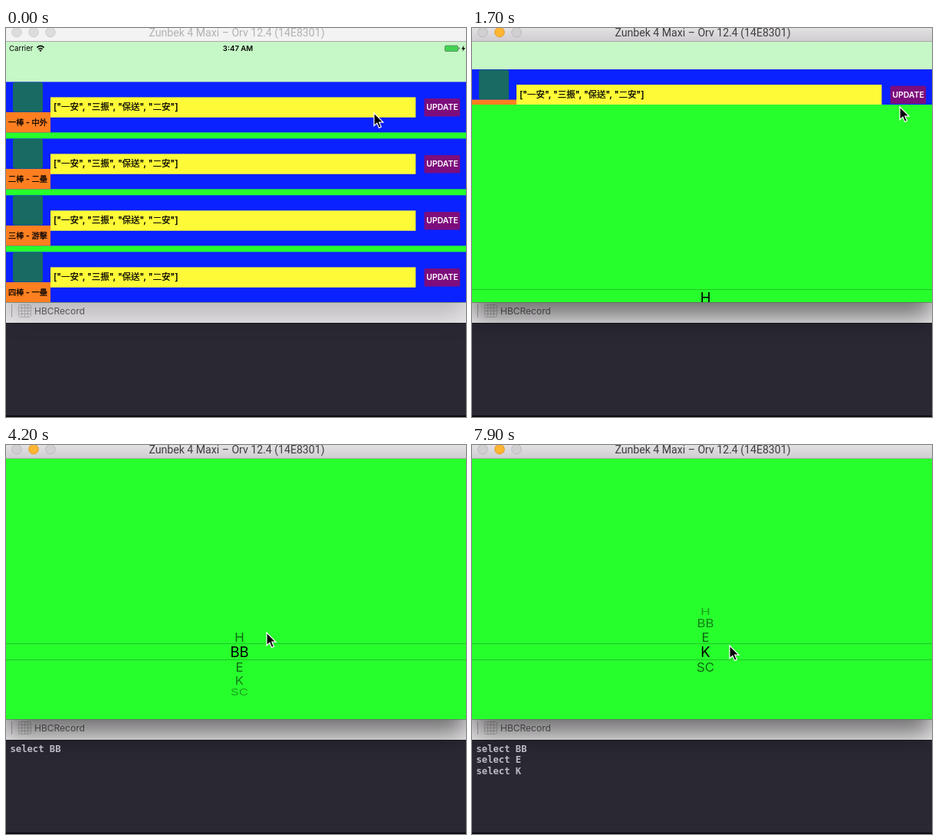
Write an HTML page that moves like this. It is 600 px wide and 508 px high and loops after 8 s.

```html
<!DOCTYPE html>
<html lang="zh-Hant">
<head>
<meta charset="utf-8">
<title>Batting record picker</title>
<style>
  html, body { margin: 0; width: 100%; height: 100%; overflow: hidden; background: #292833; }
  svg { display: block; width: 600px; height: 508px; }
  text { font-family: Inter, "Noto Sans CJK TC", "Noto Sans CJK JP", "Noto Sans CJK", sans-serif; white-space: pre; }
  .title { font: 14.1px Roboto, sans-serif; }
  .small { font-size: 9.6px; }
  .log { font: bold 12.2px "DejaVu Sans Mono", monospace; fill: #bdbbc4; }
  .order { font-size: 10.2px; font-weight: 500; stroke: #000; stroke-width: .25px; }
  .record { font-size: 11.5px; font-weight: 500; stroke: #000; stroke-width: .25px; }
  .button { font-size: 10.5px; font-weight: 600; fill: #fff; }
  .mid { text-anchor: middle; }
</style>
</head>
<body>
<svg viewBox="0 0 600 508" xmlns="http://www.w3.org/2000/svg">
  <defs>
    <linearGradient id="bar" x2="0" y2="1">
      <stop stop-color="#e4e1e4"/><stop offset="1" stop-color="#d0cdd0"/>
    </linearGradient>
    <filter id="blur" x="-20%" y="-30%" width="140%" height="160%"><feGaussianBlur stdDeviation="16"/></filter>
    <clipPath id="below"><rect y="358" width="600" height="150"/></clipPath>
    <clipPath id="screen"><rect y="18" width="600" height="340"/></clipPath>
    <clipPath id="lensClip"><rect y="260" width="600" height="20.5"/></clipPath>
    <clipPath id="dimClip"><path d="M0 190H600V259.5H0ZM0 281H600V358H0Z"/></clipPath>
  </defs>

  <rect width="600" height="508" fill="#292833"/>
  <rect y="506" width="600" height="2" fill="#0d0b12"/>

  <g clip-path="url(#below)">
    <rect y="358" width="600" height="27" fill="#eae8ea"/>
    <path d="M7.5 361V378" stroke="#a9a7a9"/>
    <g fill="none" stroke="#bfbdbf">
      <rect x="16.5" y="361.5" width="16" height="16" rx="2"/>
      <path d="M20.5 361V378M24.5 361V378M28.5 361V378M16 365.5H33M16 369.5H33M16 373.5H33"/>
      <circle cx="24.5" cy="369.5" r="4.5"/>
    </g>
    <text x="37" y="373.6" font-size="12" fill="#656365">HBCRecord</text>
    <path d="M0 385.5H600" stroke="#1b1a22"/>
    <rect id="shadow" y="100" width="599" height="277" filter="url(#blur)"/>
  </g>
  <g id="logs"></g>

  <g clip-path="url(#screen)">
    <rect y="18" width="600" height="340" fill="#27ff2d"/>
    <g id="list">
      <rect y="18" width="600" height="53" fill="#c6f7c7"/>
      <g id="rows"></g>
    </g>
    <g id="status">
      <text class="small" x="4" y="30.3">Carrier</text>
      <g fill="none" stroke="#000" stroke-width="1.5">
        <path d="M40.4 25.6Q45 21.2 49.6 25.6M42.2 27.8Q45 25.2 47.8 27.8"/>
      </g>
      <path d="M45 31L43.3 29.2Q45 27.8 46.7 29.2Z"/>
      <text class="small mid" x="302.5" y="30.3" font-weight="600">3:47 AM</text>
      <rect x="572.5" y="23" width="17" height="7.5" rx="1.5" fill="#42d354" stroke="#58805c" stroke-width=".8"/>
      <path d="M591 25.3V28.3" stroke="#58805c" stroke-width="1.2"/>
      <path d="M597.5 22.5L594 27.4H596.4L595.4 31L599 26H596.7Z"/>
    </g>
    <g id="modal">
      <rect y="18" width="600" height="342" fill="#27ff2d"/>
      <g id="dim" clip-path="url(#dimClip)"></g>
      <g id="lens" clip-path="url(#lensClip)"></g>
      <path d="M0 259.5H600M0 280.5H600" stroke="#1fc526"/>
    </g>
  </g>
  <path d="M0 358.5H600" stroke="#4d6b50" stroke-opacity=".6"/>

  <rect id="titleBar" width="600" height="17"/>
  <path d="M0 17.5H600" stroke="#aaa7aa"/>
  <g id="dots" stroke-width="1"></g>
  <text id="title" class="title mid" x="301" y="11">Zunbek 4 Maxi – Orv 12.4 (14E8301)</text>

  <g id="pointer">
    <g id="ring" fill="none">
      <circle r="23.3" stroke="#fff" stroke-opacity=".75" stroke-width="3.6"/>
      <circle r="23.3" stroke="#000" stroke-width="1.8"/>
    </g>
    <path d="M0 -1V15.6L3.9 12.2L6.6 18.4L9.4 17.2L6.8 11.2H12Z" stroke="#fff" stroke-width="1.2"/>
  </g>
</svg>

<script>
const LOOP = 8000, STEP = 100;
const $ = id => document.getElementById(id);

function add(parent, tag, attrs, text = "") {
  const el = document.createElementNS("http://www.w3.org/2000/svg", tag);
  for (const name in attrs) el.setAttribute(name, attrs[name]);
  el.textContent = text;
  return parent.appendChild(el);
}

// Eased value through [time, value] keys, held at both ends.
function track(keys, t) {
  if (t <= keys[0][0]) return keys[0][1];
  for (let i = 1; i < keys.length; i++) {
    const [t0, a] = keys[i - 1], [t1, b] = keys[i];
    if (t < t1) {
      const s = (t - t0) / (t1 - t0);
      return a + (b - a) * s * s * (3 - 2 * s);
    }
  }
  return keys[keys.length - 1][1];
}

["一棒 - 中外", "二棒 - 二壘", "三棒 - 游擊", "四棒 - 一壘"].forEach((label, i) => {
  const row = add($("rows"), "g", { transform: `translate(0 ${70.4 + 74 * i})` });
  const box = (x, y, width, height, fill, rx = 0) => add(row, "rect", { x, y, width, height, fill, rx });
  box(0, 0, 600, 66, "#0a22ff");
  box(9, 0.4, 39, 39, "#176b62", 3);
  box(0, 39.6, 58, 26.4, "#ff7f20");
  box(58, 20, 476.4, 26.4, "#fffa37");
  box(545.6, 21.6, 46.6, 23.4, "#7d0d7d", 2);
  add(row, "text", { x: 3, y: 56.8, class: "order" }, label);
  add(row, "text", { x: 62, y: 37, class: "record" }, '["一安", "三振", "保送", "二安"]');
  add(row, "text", { x: 569, y: 37, class: "button mid" }, "UPDATE");
});

const dots = [14, 36, 58].map(cx => add($("dots"), "circle", { cx, cy: 5.5, r: 6.3 }));

const logs = [["select BB", 4100], ["select E", 6000], ["select K", 7800]].map(([text, at], i) => ({
  at, el: add($("logs"), "text", { x: 5.5, y: 401 + 14.3 * i, class: "log" }, text)
}));

const options = ["H", "BB", "E", "K", "SC"].map(name => ({
  dim: add($("dim"), "text", { class: "mid", dy: ".364em", "font-size": 16.8 }, name),
  lens: add($("lens"), "text", { class: "mid", dy: ".364em", "font-size": 18.5 }, name)
}));

const pointerX = [[200, 480], [1100, 558], [1900, 558], [2700, 340], [4300, 340], [4900, 336]];
const pointerY = [[200, 112], [1100, 104], [1900, 104], [2700, 267], [3100, 267], [3600, 246],
  [4300, 246], [5000, 263], [5200, 263], [5700, 241], [6100, 241], [6700, 282], [7000, 282], [7400, 263]];
const wheel = [[3200, 0], [3900, 1], [5300, 1], [5870, 2], [7100, 2], [7700, 3]];
const presses = [[3000, 3700], [5100, 5800], [6900, 7500]];

function drawWindow(active) {
  $("titleBar").setAttribute("fill", active ? "url(#bar)" : "#f4f3f4");
  $("title").setAttribute("fill", active ? "#3f3d3f" : "#b3b1b3");
  $("shadow").setAttribute("opacity", active ? .52 : .2);
  dots.forEach((dot, i) => {
    const lit = active && i === 1;
    dot.setAttribute("fill", lit ? "#fdb532" : active ? "#d2cfd2" : "#dddbdd");
    dot.setAttribute("stroke", lit ? "#e09b2c" : active ? "#bcb9bc" : "#cfcdcf");
  });
}

function drawTransition(t) {
  const elapsed = Math.max(0, t - 1500);
  const x = elapsed * .0137;
  const offset = 340 * (1 + x) * Math.exp(-x);
  const hide = Math.min(1, elapsed / 200);
  $("modal").setAttribute("transform", `translate(0 ${offset < .5 ? 0 : offset})`);
  $("list").setAttribute("transform", `translate(0 ${-16.4 * hide})`);
  $("status").setAttribute("opacity", 1 - hide);
}

function drawWheel(t) {
  const position = track(wheel, t), radius = 71, pitch = .28;
  options.forEach(({ dim, lens }, i) => {
    const angle = (i - position) * pitch;
    const squeeze = Math.cos(angle);
    const place = `translate(304.5 ${270.4 + radius * Math.sin(angle)}) scale(1 ${squeeze})`;
    dim.setAttribute("transform", place);
    dim.setAttribute("opacity", .62 * squeeze ** 1.2);
    lens.setAttribute("transform", place);
  });
}

function draw(t) {
  drawWindow(t >= 1400);
  drawTransition(t);
  drawWheel(t);
  logs.forEach(({ at, el }) => el.setAttribute("visibility", t >= at ? "visible" : "hidden"));
  $("pointer").setAttribute("transform", `translate(${track(pointerX, t)} ${track(pointerY, t)})`);
  const pressed = presses.some(([from, to]) => t >= from && t < to);
  $("ring").setAttribute("visibility", pressed ? "visible" : "hidden");
}

const start = performance.now();
function tick() {
  const t = (performance.now() - start) % LOOP;
  draw(Math.floor((t + 1) / STEP) * STEP % LOOP);
  requestAnimationFrame(tick);
}
tick();
</script>
</body>
</html>
```
